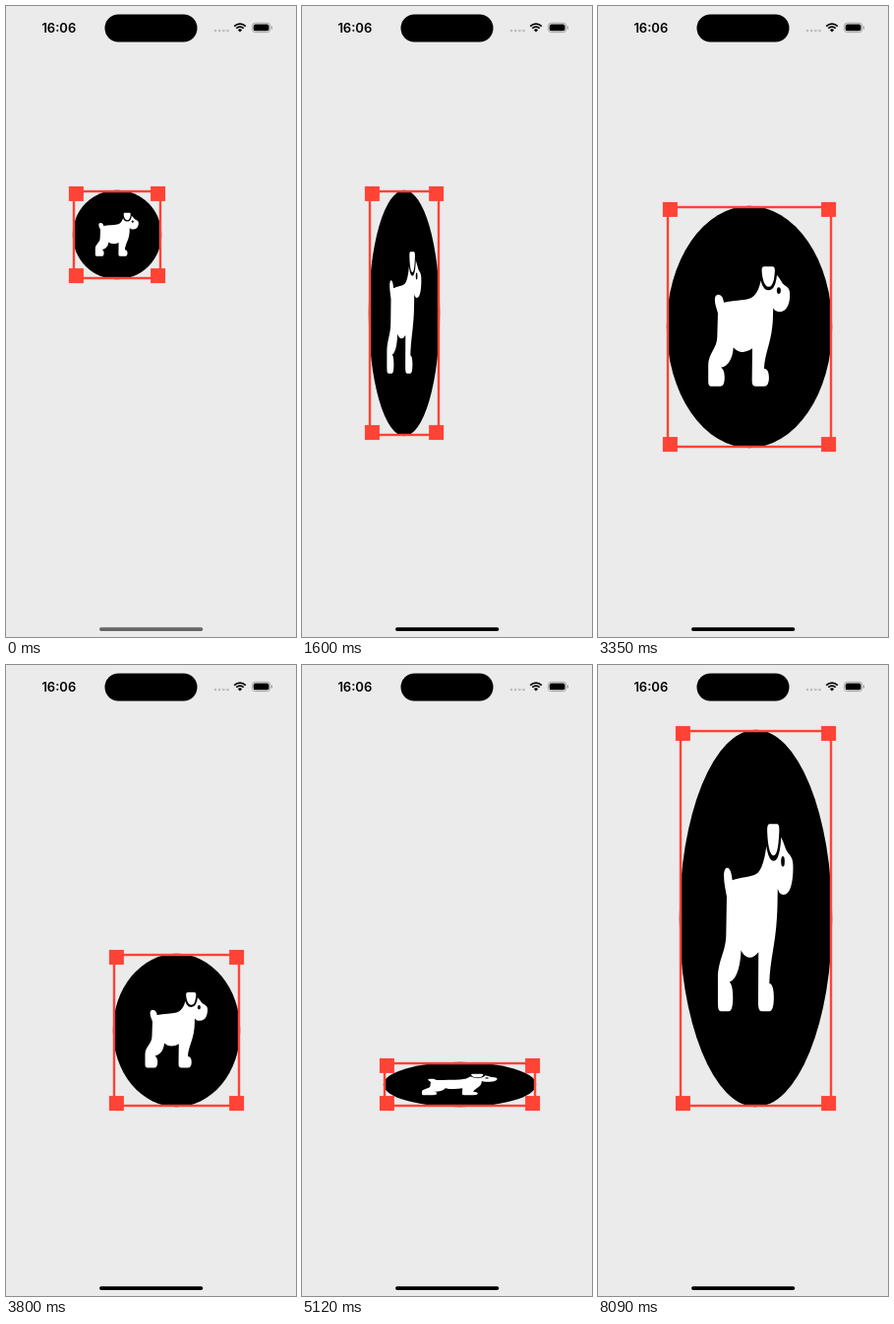
These frames come from a looping animation (295x640 px, 8750 ms). An HTML page with a canvas:

```html
<!DOCTYPE html>
<html lang="en">
<head>
<meta charset="utf-8">
<title>Resizable sticker</title>
<style>
html, body { margin: 0; width: 100%; height: 100%; overflow: hidden; background: #ebebeb; }
canvas { display: block; width: 295px; height: 640px; }
</style>
</head>
<body>
<canvas id="stage"></canvas>
<script>
const W = 295, H = 640, LOOP = 8750;
const RED = '#ff4335', LINE = 2.4, HANDLE = 15, OVERHANG = 5.1;

const canvas = document.getElementById('stage');
const ctx = canvas.getContext('2d');
const dpr = window.devicePixelRatio || 1;
canvas.width = W * dpr;
canvas.height = H * dpr;

// Each drag moves some edges of the box; every row is [time, ...edge positions].
const start = { left: 69, top: 188, right: 157, bottom: 276 };
const drags = [
  { edges: ['right', 'bottom'], rows: [
    [870, 149, 335], [980, 134, 416], [1130, 134, 433],
    [1600, 139, 435], [1720, 190, 442], [1830, 237, 447]] },
  { edges: ['left', 'top'], rows: [
    [3350, 71, 204], [3460, 75, 224], [3570, 83, 247], [3690, 95, 271],
    [3800, 110, 294], [3910, 132, 330], [4030, 160, 372], [4150, 181, 404]] },
  { edges: ['left'], rows: [
    [4250, 185], [4760, 172], [4880, 138], [5000, 102], [5120, 84]] },
  { edges: ['top'], rows: [
    [7610, 359.5], [7710, 262], [7820, 155], [7930, 82], [8090, 67]] }
];

// Dog drawn in a 100 by 100 box.
const body = new Path2D(`M50 38.2 C54 37.5 56 34 57 30.8 L66 27.8 C68 29 69 30.5 70.5 32
  C72 33 74.8 33.5 74.8 36 C75 39.5 73.5 43.7 68.5 43.7 C66.5 43.7 65 43 64.6 42
  C64.4 45 64.5 48 64 50 C63 57 59.5 61 59 67.4 C61 67.4 62 69 62 71
  C62 73.5 61 74.8 59 74.8 L54 74.8 C52.3 74.8 51.6 74 51.6 72.5 L51.8 59
  C48 61 43 61 40.2 58.5 C39.8 63 37 66.5 32.5 67 C34 67.5 34.8 69 34.8 71
  C34.8 73.5 34 74.8 32 74.8 L27 74.8 C25.2 74.8 24.8 74 24.8 72.5 L24.8 66
  C24.8 61 30.3 59 30.3 54 L30.7 44.2 C30 42.5 28.8 40.5 28.8 38.6
  C28.8 37.2 29.8 36.5 31 36.5 C33 36.5 34 38 34.4 39.8 C40 39 46 39 50 38.2 Z`);
const ear = new Path2D(`M59 24.8 L64 24.8 C65.3 24.8 65.7 25.5 65.6 26.5
  C65.3 30 64.5 33.2 61.8 33.2 C59 33.2 57.8 29.5 57.6 26.5 C57.6 25.4 58 24.8 59 24.8 Z`);

function boxAt(t) {
  const box = { ...start };
  for (const { edges, rows } of drags) {
    for (const [time, ...values] of rows) {
      if (t >= time) edges.forEach((edge, i) => { box[edge] = values[i]; });
    }
  }
  return box;
}

function pill(x, y, w, h, r, color) {
  ctx.fillStyle = color;
  ctx.beginPath();
  ctx.roundRect(x, y, w, h, r);
  ctx.fill();
}

function disc(x, y, rx, ry, color) {
  ctx.fillStyle = color;
  ctx.beginPath();
  ctx.ellipse(x, y, rx, ry, 0, 0, Math.PI * 2);
  ctx.fill();
}

function drawWifi(x, y) {
  const from = -Math.PI * 0.75, to = -Math.PI * 0.25;
  ctx.strokeStyle = '#000';
  ctx.lineWidth = 1.8;
  for (const r of [8.2, 5.2]) {
    ctx.beginPath();
    ctx.arc(x, y, r, from, to);
    ctx.stroke();
  }
  ctx.fillStyle = '#000';
  ctx.beginPath();
  ctx.moveTo(x, y);
  ctx.arc(x, y, 3, from, to);
  ctx.fill();
}

function drawPhone(t) {
  ctx.fillStyle = '#000';
  ctx.font = '600 13px Inter, Roboto, sans-serif';
  ctx.textAlign = 'center';
  ctx.textBaseline = 'alphabetic';
  ctx.fillText('16:06', 53.8, 26.7);

  pill(100.5, 8.5, 94, 28, 14, '#000');
  for (let i = 0; i < 4; i++) disc(213 + i * 4.2, 25, 1.35, 1.35, '#bdbdbd');
  drawWifi(238, 26.4);

  ctx.strokeStyle = '#a0a0a0';
  ctx.lineWidth = 0.9;
  ctx.beginPath();
  ctx.roundRect(250.4, 17.2, 18.4, 9.4, 3);
  ctx.stroke();
  pill(251.7, 18.5, 15.8, 6.8, 1.9, '#000');
  pill(269.8, 20.3, 1.2, 3.2, 0.6, '#a0a0a0');

  pill(95, 630.2, 105.3, 3.8, 1.9, t < 1600 ? '#666' : '#000');
}

function drawDog(x, y, w, h) {
  ctx.save();
  ctx.translate(x, y);
  ctx.scale(w / 100, h / 100);
  ctx.fillStyle = '#fff';
  ctx.fill(body);
  ctx.strokeStyle = '#000';
  ctx.lineWidth = 3;
  ctx.stroke(ear);
  ctx.fillStyle = '#fff';
  ctx.fill(ear);
  disc(68, 34.8, 1.2, 1.4, '#000');
  ctx.restore();
}

function drawSticker({ left, top, right, bottom }) {
  const w = right - left, h = bottom - top;
  disc(left + w / 2, top + h / 2, w / 2 + LINE / 2, h / 2 + LINE / 2, '#000');
  drawDog(left, top, w, h);

  ctx.strokeStyle = RED;
  ctx.lineWidth = LINE;
  ctx.strokeRect(left, top, w, h);

  ctx.fillStyle = RED;
  for (const x of [left - OVERHANG, right + OVERHANG - HANDLE]) {
    for (const y of [top - OVERHANG, bottom + OVERHANG - HANDLE]) {
      ctx.fillRect(x, y, HANDLE, HANDLE);
    }
  }
}

function draw(t) {
  ctx.setTransform(dpr, 0, 0, dpr, 0, 0);
  ctx.fillStyle = '#ebebeb';
  ctx.fillRect(0, 0, W, H);
  drawPhone(t);
  drawSticker(boxAt(t));
}

let origin;
function tick(now) {
  origin ??= now;
  draw((now - origin) % LOOP);
  requestAnimationFrame(tick);
}
draw(0);
requestAnimationFrame(tick);
</script>
</body>
</html>
```
